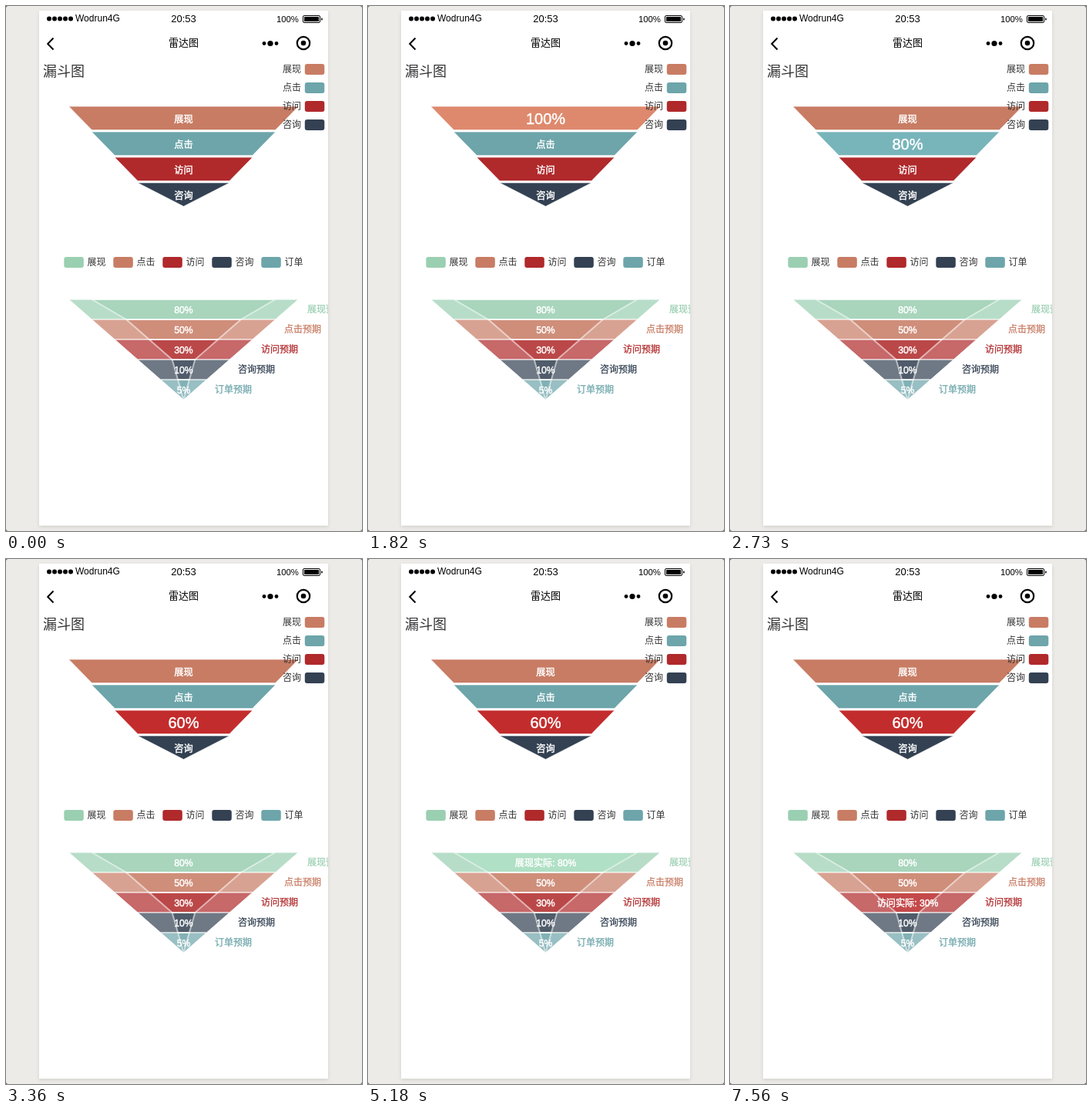
An HTML page that plays this animation: 462x680 px, repeating every 7630 ms.

```html
<!DOCTYPE html>
<html lang="zh-CN">
<head>
<meta charset="utf-8">
<title>漏斗图</title>
<style>
  html, body { margin: 0; width: 100%; height: 100%; overflow: hidden; background: #55544f; }
  svg { display: block; width: 462px; height: 680px; }
  text { font-family: "Liberation Sans", Arial, "Noto Sans CJK SC", "Noto Sans CJK", sans-serif; }
  .label { fill: #fff; stroke: #fff; stroke-width: .45px; }
</style>
</head>
<body>
<svg id="stage" viewBox="0 0 462 680" xmlns="http://www.w3.org/2000/svg">
  <defs>
    <clipPath id="screen"><rect x="43" y="6" width="375" height="667"/></clipPath>
    <filter id="soft" x="-5%" y="-5%" width="110%" height="110%"><feGaussianBlur stdDeviation="2.5"/></filter>
  </defs>
  <rect width="462" height="680" rx="3" fill="#ecebe7"/>
  <rect x="43" y="8" width="375" height="667" fill="#000" opacity=".1" filter="url(#soft)"/>
  <rect x="43" y="6" width="375" height="667" fill="#fff"/>
  <g id="phone" clip-path="url(#screen)"></g>
</svg>
<script>
const LOOP = 7630, CX = 230.5, HALF = 149;
const GREEN = '#9acfb1', ORANGE = '#c87c64', RED = '#b0292b', NAVY = '#334152', TEAL = '#6da5aa';
const LIFT = { [GREEN]: '#aae4c3', [ORANGE]: '#de896d', [RED]: '#c32c2d', [NAVY]: '#38485a', [TEAL]: '#78b5bb' };

const phone = document.getElementById('phone');

function add(tag, attrs, text) {
  const el = document.createElementNS('http://www.w3.org/2000/svg', tag);
  for (const key in attrs) el.setAttribute(key, attrs[key]);
  if (text) el.textContent = text;
  phone.append(el);
  return el;
}

// y is the visual middle of the line
function write(str, x, y, size, attrs = {}) {
  const el = add('text', { x, 'font-size': size, fill: '#333', ...attrs }, str);
  el.setAttribute('y', y + size * .37);
  return el;
}

function trapezoid(y, height, top, bottom, attrs) {
  const points = [[-top, y], [top, y], [bottom, y + height], [-bottom, y + height]];
  return add('polygon', { points: points.map(([x, py]) => `${CX + x},${py}`).join(' '), ...attrs });
}

function swatch(x, y, fill) {
  add('rect', { x, y: y - 7, width: 25.5, height: 14, rx: 3, fill });
}

function dot(cx, cy, r, attrs = {}) {
  add('circle', { cx, cy, r, ...attrs });
}

function drawBars() {
  for (let i = 0; i < 5; i++) dot(56 + i * 7, 16.5, 3);
  write('Wodrun4G', 90, 16, 12, { fill: '#000' });
  write('20:53', CX, 16, 13, { fill: '#000', 'text-anchor': 'middle' });
  write('100%', 351, 16.5, 11.3, { fill: '#000' });
  add('rect', { x: 385.5, y: 12.5, width: 22, height: 9, rx: 1.5, fill: 'none', stroke: '#000' });
  add('rect', { x: 387, y: 14, width: 19, height: 6, rx: .5 });
  add('rect', { x: 409, y: 15.5, width: 1.6, height: 3, rx: .8 });

  add('path', { d: 'M61.5 41.5 L54.2 49 L61.5 56.5', fill: 'none', stroke: '#000', 'stroke-width': 2 });
  write('雷达图', CX, 47, 13, { fill: '#000', 'text-anchor': 'middle' });
  dot(335, 48.5, 2.4);
  dot(343, 48.5, 3.6);
  dot(351, 48.5, 2.4);
  dot(386, 48, 8.2, { fill: 'none', stroke: '#000', 'stroke-width': 2.2 });
  dot(386, 48, 3.3);
}

function makeRow(shape, color, y, plain, active, activeSize) {
  const label = write(plain, CX, y, 12.2, { class: 'label', 'text-anchor': 'middle' });
  return on => {
    const size = on ? activeSize : 12.2;
    shape.setAttribute('fill', on ? LIFT[color] : color);
    label.textContent = on ? active : plain;
    label.setAttribute('font-size', size);
    label.setAttribute('y', y + size * .37);
  };
}

function drawSimpleFunnel() {
  const names = ['展现', '点击', '访问', '咨询'];
  const colors = [ORANGE, TEAL, RED, NAVY];
  const sizes = [1, .8, .6, .4, 0];
  const rows = names.map((name, i) => {
    const y = 130 + i * 33;
    const shape = trapezoid(y, 30.5, HALF * sizes[i], HALF * sizes[i + 1],
      { fill: colors[i], stroke: '#fff', 'stroke-width': .6 });
    return makeRow(shape, colors[i], y + 16, name, sizes[i] * 100 + '%', 20);
  });
  names.forEach((name, i) => {
    const y = 82 + i * 24;
    write(name, 359, y, 12);
    swatch(387.8, y, colors[i]);
  });
  return rows;
}

function drawCompareFunnel() {
  const names = ['展现', '点击', '访问', '咨询', '订单'];
  const colors = [GREEN, ORANGE, RED, NAVY, TEAL];
  const expected = [100, 80, 60, 40, 20, 0];
  const actual = [80, 50, 30, 10, 5, 0];
  const rowY = i => 380 + i * 26;
  const layer = (values, opacity, width) => colors.map((fill, i) =>
    trapezoid(rowY(i), 26, HALF * values[i] / 100, HALF * values[i + 1] / 100,
      { fill, opacity, stroke: '#fff', 'stroke-width': width, 'stroke-linejoin': 'bevel' }));

  layer(expected, .7, 1);
  const inner = layer(actual, .5, 2);
  names.forEach((name, i) => {
    swatch(75.3 + i * 64, 332, colors[i]);
    write(name, 105.5 + i * 64, 332, 12);
    write(name + '预期', 391 - i * 30, rowY(i) + 13, 12,
      { fill: colors[i], stroke: colors[i], 'stroke-width': .25 });
  });
  return names.map((name, i) =>
    makeRow(inner[i], colors[i], rowY(i) + 13, actual[i] + '%', `${name}实际: ${actual[i]}%`, 12.2));
}

drawBars();
write('漏斗图', 48, 84, 18);
const simple = drawSimpleFunnel();
const compare = drawCompareFunnel();

// [start ms, active row above, active row below]
const STEPS = [
  [0, -1, -1],
  [1820, 0, -1],
  [2730, 1, -1],
  [3360, 2, -1],
  [5180, 2, 0],
  [5670, 2, 1],
  [6230, 2, 2]
];

let shown = null;
function tick() {
  const t = performance.now() % LOOP;
  const step = STEPS.findLast(s => s[0] <= t);
  if (step !== shown) {
    shown = step;
    simple.forEach((set, i) => set(i === step[1]));
    compare.forEach((set, i) => set(i === step[2]));
  }
  requestAnimationFrame(tick);
}
tick();
</script>
</body>
</html>
```
